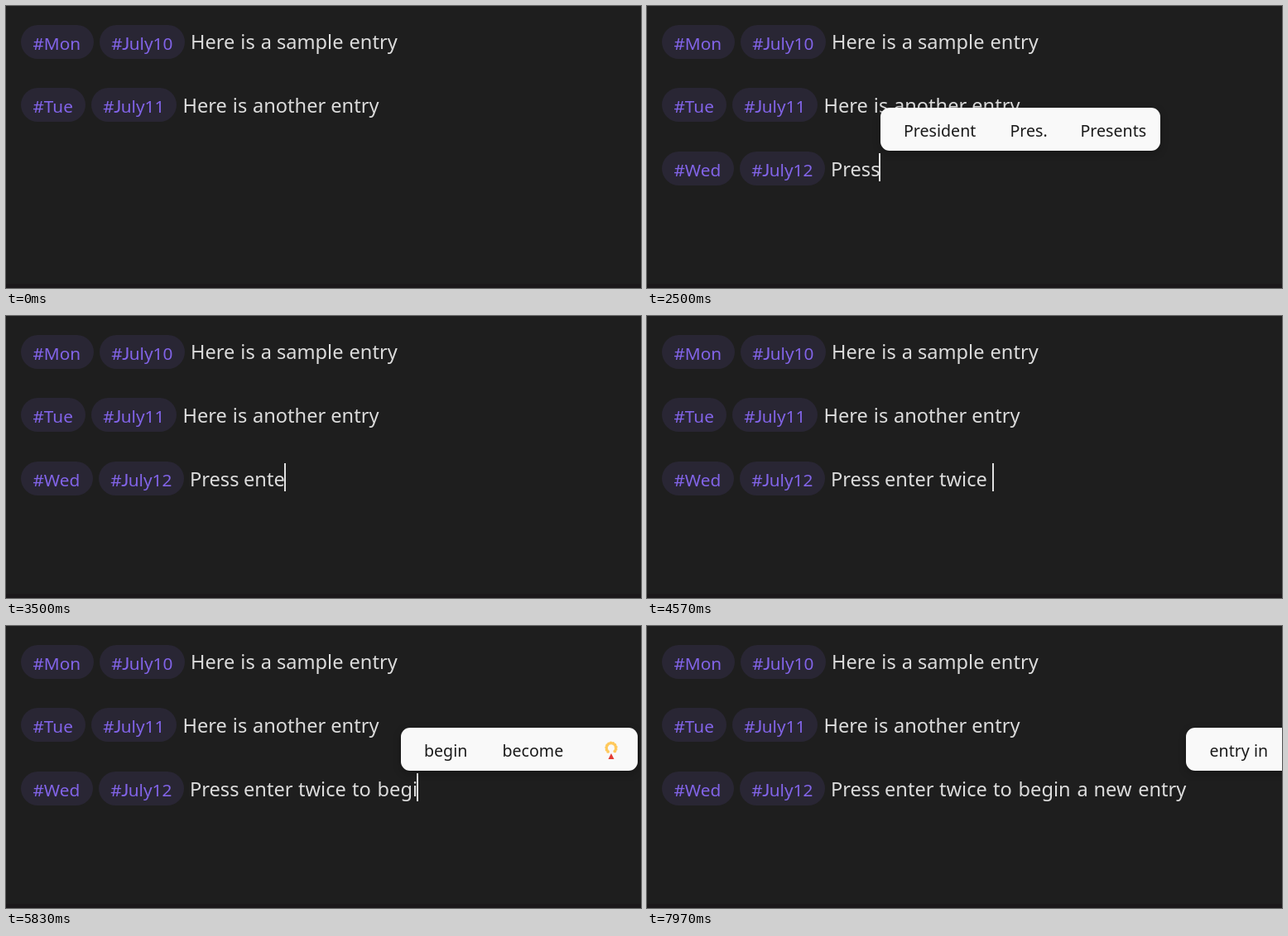
Write an HTML page with a canvas that moves like this. It is 767x341 px and loops after 8 s.

```html
<!DOCTYPE html>
<html lang="en">
<head>
<meta charset="utf-8">
<title>Journal entries</title>
<style>
html, body { margin: 0; width: 100%; height: 100%; overflow: hidden; background: #1e1e1e; }
canvas { display: block; width: 767px; height: 341px; }
</style>
</head>
<body>
<canvas id="stage" width="767" height="341"></canvas>
<script>
const LOOP = 8000;
const ctx = document.getElementById("stage").getContext("2d");
const SANS = '"Noto Sans", "Open Sans", sans-serif';
const BODY = "23.6px " + SANS;
const TAG = "20.8px " + SANS;
const HOOK = '21.5px Lato, "Noto Sans", sans-serif';
const MENU = "19.6px " + SANS;
const INK = "#dcdcdc", VIOLET = "#8264e8", PILL = "#292634";

// Each word of the typed line: text, left edge, key press times (last one is the space)
const words = [
  ["Press", 222, [2030, 2170, 2230, 2300, 2500, 3030]],
  ["enter", 287, [3170, 3300, 3430, 3500, 3630, 3700]],
  ["twice", 353, [3900, 4030, 4100, 4300, 4430, 4570]],
  ["to", 418, [4700, 4830, 4970]],
  ["begin", 448.6, [5170, 5500, 5700, 5830, 5900, 6030]],
  ["a", 519.5, [6100, 6230]],
  ["new", 539.5, [6300, 6370, 6430, 6500]],
  ["entry", 593.2, [6970, 7100, 7230, 7370, 7430]]
];

// Suggestion menus: start, end, left, right, items as [text, x]
const menus = [
  [2500, 2570, 282, 620, [["President", 310], ["Pres.", 438.5], ["Presents", 523.5]]],
  [2770, 2970, 294, 610, [["Press", 322], ["Pressure", 411], ["Pretty", 532]]],
  [4430, 4570, 387, 657, [["twice", 415], ["twin", 505], ["twitch", 585]]],
  [5300, 5500, 450, 757, [["begin", 478], ["become", 573], ["build", 690]]],
  [5630, 5900, 477, 763, [["begin", 505], ["become", 599.5], ["*", 731]]],
  [6700, 7170, 594, 790, [["one", 622.7], ["chat", 699.7]]],
  [7630, 8000, 651, 790, [["entry in", 679.5]]]
];

function put(text, x, y, font, color) {
  ctx.font = font;
  ctx.fillStyle = color;
  ctx.fillText(text, x, y);
}

function box(x, y, w, h, r, color) {
  ctx.fillStyle = color;
  ctx.beginPath();
  ctx.roundRect(x, y, w, h, r);
  ctx.fill();
}

function tags(top, day, dayEnd, date) {
  const x = dayEnd + 7;
  const y = top + 29.5;
  box(18, top, dayEnd - 18, 41, 20.5, PILL);
  put("#" + day, 32.4, y, TAG, VIOLET);
  box(x, top, 103, 41, 20.5, PILL);
  put("#", x + 14.3, y, TAG, VIOLET);
  put("J", x + 27.2, y, HOOK, VIOLET);
  put("uly" + date, x + 35.7, y, TAG, VIOLET);
}

function line(y, parts) {
  for (const [text, x] of parts) put(text, x, y, BODY, INK);
}

function caret(x, y) {
  ctx.fillStyle = "#e0e0e0";
  ctx.fillRect(Math.floor(x), y, 2, 34);
}

function charm(x) {
  ctx.fillStyle = "#ffc95c";
  for (let i = 0; i < 11; i++) {
    const a = 2.3 + i * 0.47;
    ctx.beginPath();
    ctx.arc(x + Math.cos(a) * 5.8, 147.5 + Math.sin(a) * 6, 1.9, 0, 7);
    ctx.fill();
  }
  ctx.fillStyle = "#e23b32";
  ctx.beginPath();
  ctx.moveTo(x, 154);
  ctx.lineTo(x + 3.5, 161);
  ctx.lineTo(x - 3.5, 161);
  ctx.fill();
}

function menu([, , left, right, items]) {
  ctx.save();
  ctx.shadowColor = "rgba(0,0,0,0.25)";
  ctx.shadowBlur = 10;
  ctx.shadowOffsetY = 3;
  box(left, 123, right - left, 52, 11, "#f9f9f9");
  ctx.restore();
  for (const [text, x] of items) {
    if (text === "*") charm(x);
    else put(text, x, 158, MENU, "#1b1b1b");
  }
}

function typed(t) {
  let end = 221.5;
  words.forEach(([text, x, keys], i) => {
    const n = keys.filter(k => k <= t).length;
    if (!n) return;
    const part = text.slice(0, n);
    put(part, x, 206, BODY, INK);
    end = (n > text.length ? words[i + 1][1] : x + ctx.measureText(part).width) - 0.7;
  });
  return end;
}

function draw(t) {
  ctx.fillStyle = "#1e1e1e";
  ctx.fillRect(0, 0, 767, 341);
  ctx.fillStyle = "#1b181a";
  ctx.fillRect(0, 336, 767, 5);

  tags(23, "Mon", 106, "10");
  line(52, [["Here", 223], ["is", 283.3], ["a", 307.8], ["sample", 327], ["entry", 414.5]]);
  tags(99, "Tue", 96, "11");
  line(129, [["Here", 213.4], ["is", 273.8], ["another", 298], ["entry", 392.3]]);

  if (t >= 500 && t < 970) caret(449, 101);
  else if (t >= 970 && t < 1170) caret(18, 139);
  else if (t >= 1170) {
    tags(176, "Wed", 105, "12");
    const end = typed(t);
    const blink = (t >= 1700 && t < 2030) || t >= 7970;
    if (!blink) caret(end, 178);
  }
  for (const m of menus) if (t >= m[0] && t < m[1]) menu(m);
}

const start = performance.now();
function tick() {
  draw((performance.now() - start) % LOOP);
  requestAnimationFrame(tick);
}
tick();
</script>
</body>
</html>
```
